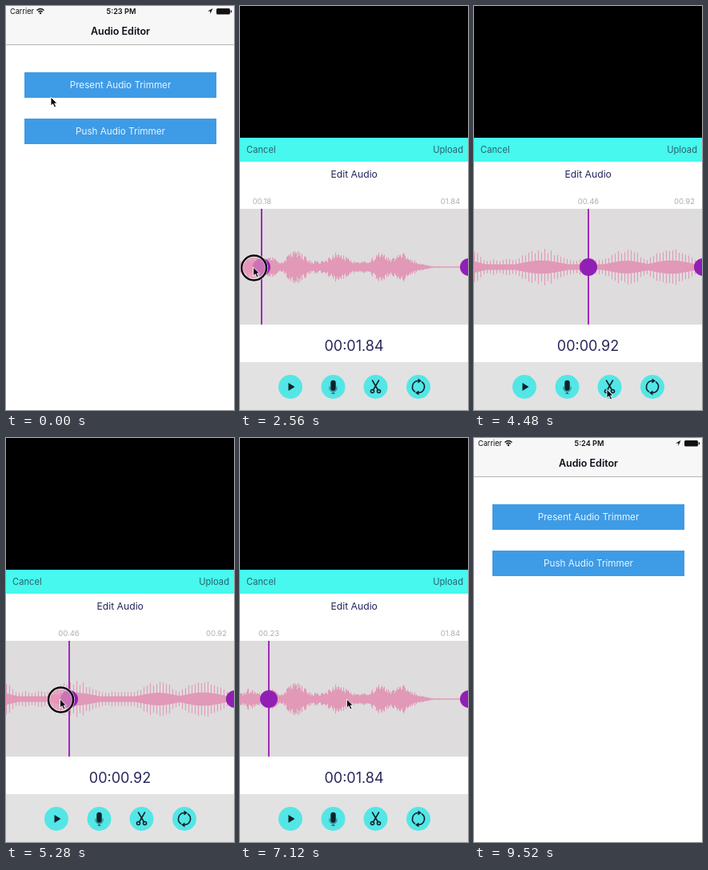
An HTML page for the animation above (9600 ms loop, 285 px wide and 506 px high).

```html
<!DOCTYPE html>
<html lang="en">
<head>
<meta charset="utf-8">
<title>Audio Editor</title>
<style>
  html, body { margin: 0; width: 100%; height: 100%; overflow: hidden; background: #fff; }
  svg { display: block; width: 100vw; height: 100vh; }
  text { font-family: Inter, "Open Sans", sans-serif; fill: #26265c; }
  .mid { text-anchor: middle; }
  .status { font-size: 9.2px; fill: #111; }
  .cta { font-size: 11.7px; fill: #e9f5ff; }
  .nav { font-size: 11.2px; fill: #2c6267; }
  .label { font-size: 9.5px; fill: #aeaeae; }
  .ink { fill: none; stroke: #10222b; stroke-width: 1.6; stroke-linecap: round; }
  .solid { fill: #10222b; }
  .disc { fill: #54e6e6; }
  .disc.down { fill: #3a7f83; }
  .cta-box { fill: #3e9be6; }
  .cta-box.down { opacity: .6; }
  .handle { fill: #921fb5; }
</style>
</head>
<body>
<svg viewBox="0 0 285 506" preserveAspectRatio="none">
  <defs>
    <g id="mic">
      <rect class="solid" x="-8.5" y="-22" width="17" height="35" rx="8.5"/>
      <path class="ink" d="M-12 0V4A12 12.500 0 0 0 12 4V0M0 17V22M-5 22H5"/>
    </g>
    <g id="marker">
      <rect x="-1" y="254" width="2" height="145" fill="#a02bb8"/>
      <circle class="handle" cy="327" r="11"/>
    </g>
  </defs>

  <g id="home">
    <rect width="285" height="506" fill="#fff"/>
    <rect width="285" height="48" fill="#f7f7f7"/>
    <rect y="48" width="285" height="1" fill="#b5b5b5"/>
    <text class="status" x="5" y="10">Carrier</text>
    <g fill="none" stroke="#111" stroke-width="1.4">
      <path d="M38.500 5.500Q43 1.500 47.500 5.500M40.300 7.500Q43 5.200 45.700 7.500"/>
      <circle cx="43" cy="9" r=".5"/>
    </g>
    <text class="status mid" id="clock" x="144" y="10" font-weight="600"></text>
    <path d="M258.500 3L252 6.500H255.300V10Z" fill="#111"/>
    <rect x="263" y="3" width="17" height="7.500" rx="1.500" fill="#111"/>
    <rect x="280.700" y="5.300" width="1.300" height="3" fill="#111"/>
    <text class="mid" x="143" y="35.500" font-size="12.5" font-weight="600" style="fill:#0c0c18">Audio Editor</text>
    <rect class="cta-box" id="present" x="23" y="83" width="240" height="32"/>
    <text class="cta mid" x="143" y="103">Present Audio Trimmer</text>
    <rect class="cta-box" x="23" y="141" width="240" height="32"/>
    <text class="cta mid" x="143" y="161">Push Audio Trimmer</text>
  </g>

  <g id="modal">
    <rect width="285" height="506" fill="#000"/>
    <rect y="165" width="285" height="341" fill="#fff"/>
    <rect y="165" width="285" height="30" fill="#46f8ee"/>
    <text class="nav" x="8" y="184">Cancel</text>

    <g id="recorder">
      <circle cx="142" cy="352" r="41.500" fill="#e7e7e7"/>
      <circle class="disc" id="record" cx="142" cy="352" r="34"/>
      <use href="#mic" x="142" y="352"/>
    </g>

    <g id="editor">
      <text class="nav" x="279" y="184" text-anchor="end">Upload</text>
      <text class="mid" x="142.700" y="214.500" font-size="12.200">Edit Audio</text>
      <text class="label mid" id="leftLabel" y="248"></text>
      <text class="label mid" id="rightLabel" y="248"></text>
      <rect y="254" width="285" height="145" fill="#dedcdd"/>
      <path id="wave" fill="none" stroke="#e199b7" stroke-width="1.100"/>
      <use id="left" href="#marker"/>
      <use id="right" href="#marker"/>
      <text class="mid" id="total" x="142.500" y="432" font-size="18"></text>
      <rect y="446" width="285" height="60" fill="#e2e2e2"/>
      <g transform="translate(63 477)">
        <circle class="disc" id="play" r="15"/>
        <path class="solid" d="M-2.500 -5L5.500 0L-2.500 5Z"/>
      </g>
      <g transform="translate(116.500 477)">
        <circle class="disc" r="15"/>
        <use href="#mic" transform="scale(.38)"/>
      </g>
      <g transform="translate(169.500 477)">
        <circle class="disc" id="scissors" r="15"/>
        <path class="ink" d="M-4 -8L3 4M4 -8L-3 4"/>
        <circle class="ink" cx="-4" cy="5.500" r="2"/>
        <circle class="ink" cx="4" cy="5.500" r="2"/>
      </g>
      <g transform="translate(223 477)">
        <circle class="disc" id="reset" r="15"/>
        <g id="arrow">
          <path class="ink" d="M-4.500 6A7.500 7.500 0 0 1 0 -7.500"/>
          <path class="solid" d="M-.5 -10.500L4 -7.500L-.5 -4.500Z"/>
        </g>
        <use href="#arrow" transform="rotate(180)"/>
      </g>
    </g>
  </g>

  <g id="cursor">
    <g id="ring">
      <circle id="tint" cx="1" cy="1" r="14" fill="#e795b8" fill-opacity=".7"/>
      <circle cx="1" cy="1" r="15.500" fill="none" stroke="#fff" stroke-width="4" stroke-opacity=".7"/>
      <circle cx="1" cy="1" r="15.500" fill="none" stroke="#080810" stroke-width="2.500"/>
    </g>
    <path d="M0 0V11L2.600 8.700L4.500 13L6.600 12L4.700 8H8Z" fill="#0a0a12" stroke="#fff" stroke-width=".9"/>
  </g>
</svg>

<script>
const LOOP = 9600, STEP = 80, W = 286, MID = 327;
const FULL = 1.84, HALF = FULL / 2;
const OPEN = 1120, EDIT = 2080, TRIM = 4160, RESET = 6240, CLOSE = 9120;

const $ = id => document.getElementById(id);
const clamp = (v, lo, hi) => Math.min(hi, Math.max(lo, v));
const mix = (a, b, p) => a + (b - a) * p;
const ratio = (t, [from, to]) => clamp((t - from) / (to - from), 0, 1);

const drag = {
  sweep: [2360, 3010], end: [3360, 3680], back: [5040, 5520],
  start: [6640, 6960], finish: [7280, 7680]
};
const isTrimmed = t => t >= TRIM && t < RESET;

function leftX(t) {
  if (t < TRIM) return W / 4 * Math.abs(1 - 2 * ratio(t, drag.sweep));
  if (t < RESET) return mix(W / 2, 14, ratio(t, drag.back));
  return mix(70, 36, ratio(t, drag.start));
}

function rightX(t) {
  if (isTrimmed(t)) return W;
  return t < TRIM ? mix(W, W * .75, ratio(t, drag.end)) : mix(W, 202.6, ratio(t, drag.finish));
}

// Places the pointer visits; the handles carry it along
const spots = {
  idle: () => [56, 114],
  present: () => [92, 102],
  record: () => [169, 351],
  left: t => [Math.max(4, leftX(t) - 11), MID],
  right: t => [Math.min(278, rightX(t)), MID],
  scissors: () => [166, 480],
  reset: () => [216, 477],
  play: () => [60, 479],
  upload: () => [262, 177]
};
const visits = [
  ["idle", 0, 1], ["present", 160, 400], ["record", 640, 1360], ["left", 2080, 2360],
  ["right", 3080, 3360], ["scissors", 3680, 3920], ["left", 4560, 4880], ["reset", 5680, 6000],
  ["left", 6320, 6640], ["right", 7000, 7280], ["play", 7700, 8000], ["upload", 8320, 8880]
];
const taps = [480, 1440, 1920, 4000, 6080, 8080];
const buttons = ["present", "record", "scissors", "reset", "play"];

function pointer(t) {
  const i = visits.findLastIndex(v => t >= v[1]);
  const [spot, ...span] = visits[i];
  const from = spots[visits[Math.max(0, i - 1)][0]](t), to = spots[spot](t);
  const p = ratio(t, span);
  return { spot, x: mix(from[0], to[0], p), y: mix(from[1], to[1], p) };
}

// Loudness: bursts [centre, width, height] over a floor that fades out
const bursts = [[12, 10, 14], [37, 12, 14], [70, 17, 23], [122, 18, 19], [175, 16, 18], [203, 17, 19]];
const burst = (x, [c, w, h]) => h * Math.exp(-(((x - c) / w) ** 2));
const loudness = x => Math.max(8 * clamp((245 - x) / 30, 0, 1), ...bursts.map(b => burst(x, b)));
const noise = x => Math.abs(Math.sin(x * 127.1 + 3) * 437.5) % 1;

function wavePath(height) {
  let d = "";
  for (let x = 0; x < W; x++) {
    const h = Math.max(.8, height(x));
    d += `M${x + .5} ${(MID - h).toFixed(1)}V${(MID + h).toFixed(1)}`;
  }
  return d;
}
const fullWave = wavePath(x => loudness(x) * mix(.5, 1, noise(x)));
const trimmedWave = wavePath(x => 1.25 * loudness(80 + x / 2) * (x % 4 ? .35 : mix(.75, 1, noise(x))));

const show = (id, on) => $(id).setAttribute("display", on ? "inline" : "none");
const move = (id, x, y) => $(id).setAttribute("transform", `translate(${x} ${y})`);
const stamp = s => s.toFixed(2).padStart(5, "0");

function setMarker(id, x, seconds) {
  move(id, Math.round(x), 0);
  $(id + "Label").setAttribute("x", clamp(x, 22, 263));
  $(id + "Label").textContent = stamp(seconds);
}

function modalY(t) {
  const rise = ratio(t, [OPEN - STEP, OPEN + 160]), fall = ratio(t, [CLOSE - STEP, CLOSE + 240]);
  return 506 * ((1 - rise) ** 2 + fall ** 2);
}

function draw(t) {
  const trimmed = isTrimmed(t), length = trimmed ? HALF : FULL;
  const left = leftX(t), right = rightX(t), at = pointer(t);
  const tapping = taps.some(s => t >= s && t < s + 160);
  const dragging = Object.values(drag).some(([a, b]) => t >= a && t < b);

  $("clock").textContent = t < LOOP / 2 ? "5:23 PM" : "5:24 PM";
  move("modal", 0, modalY(t));
  show("recorder", t < EDIT);
  show("editor", t >= EDIT);
  for (const id of buttons) $(id).classList.toggle("down", tapping && at.spot === id);

  $("wave").setAttribute("d", trimmed ? trimmedWave : fullWave);
  // The start time barely moves once the clip is trimmed
  setMarker("left", left, trimmed ? mix(.46, .45, ratio(t, drag.back)) : left / W * FULL);
  setMarker("right", right, right / W * length);
  $("total").textContent = "00:" + stamp(length);

  show("cursor", t < CLOSE);
  move("cursor", at.x, at.y);
  show("ring", tapping || dragging);
  show("tint", dragging);
}

function frame() {
  draw(Math.floor(performance.now() % LOOP / STEP) * STEP);
  requestAnimationFrame(frame);
}
frame();
</script>
</body>
</html>
```
